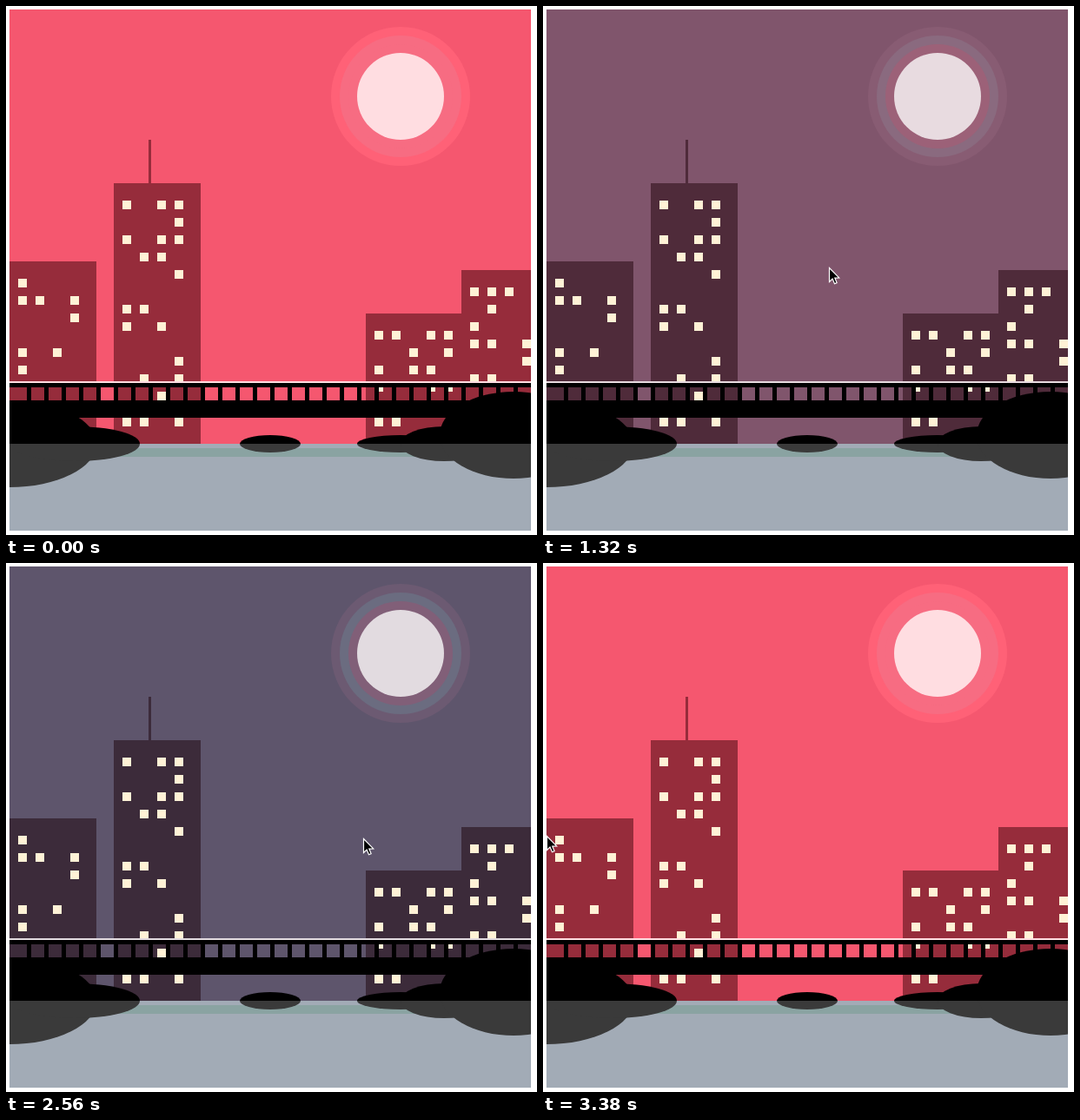
Recreate the animation shown at these times as an HTML page with a canvas. Size 611 px wide and 609 px high, loop 3.42 s.

```html
<!DOCTYPE html>
<html lang="en">
<head>
<meta charset="utf-8">
<title>City dusk</title>
<style>
html, body { margin: 0; width: 100%; height: 100%; overflow: hidden; background: #fff; }
canvas { display: block; }
</style>
</head>
<body>
<canvas id="stage" width="611" height="609"></canvas>
<script>
const ctx = document.getElementById("stage").getContext("2d");
const LOOP = 3420, SHOW = 160, STEP = 20;

// Pointer path: time, x, y
const path = [
  [160, 0, 309], [660, 70, 304], [1120, 234, 301], [1620, 481, 303],
  [1780, 549, 304], [1960, 606, 305], [2120, 606, 306], [2260, 574, 307],
  [2560, 411, 317], [2920, 128, 318], [3180, 38, 316], [3380, 4, 314]
];

// Pointer x, then sky, walls, moon and the glow rings from outside in
const tones = [
  [4, "f5576f", "962c3b", "ffdde1", "ff6177", "f76c82", "f76c82"],
  [128, "cd536b", "7e2b3a", "f2dbe0", "cf6076", "d1677d", "d1677d"],
  [234, "a8556b", "642b3a", "f0dbe0", "a85e74", "ae677e", "bb6378"],
  [411, "5e556c", "3c2b3a", "e2dbe0", "6c5a72", "6b6c80", "815f78"],
  [481, "46546c", "252b3a", "e2dbe0", "4a6178", "656680", "6f6780"],
  [574, "1c556c", "0e2b3a", "d5dbe2", "295f75", "35667b", "496b80"]
];

// Each building: x, y, width, then lit rows as y followed by x positions
const buildings = [
  { box: [4, 294, 100], lit: [[314, 14], [334, 14, 34, 74], [354, 74], [394, 14, 54], [414, 14]] },
  { box: [124, 204, 100], lit: [
    [224, 134, 174, 194], [244, 194], [264, 134, 174, 194], [284, 154, 174],
    [304, 194], [344, 134, 154], [364, 134, 174], [404, 194], [424, 154, 194],
    [444, 174], [474, 134, 154, 194]] },
  { box: [414, 354, 110], lit: [
    [374, 424, 444, 484, 504], [394, 464, 504], [414, 424, 464, 484],
    [434, 424, 484, 504], [474, 424, 444]] },
  { box: [524, 304, 80], lit: [
    [324, 534, 554, 574], [344, 554], [364, 534], [384, 534, 554, 594],
    [404, 594], [424, 534, 554]] }
];

// Rocks: centre x, centre y, radii
const rocks = [
  [4, 504, 100, 50], [79, 504, 75, 20], [304, 504, 35, 10],
  [454, 504, 50, 10], [504, 504, 50, 20], [584, 494, 85, 50]
];

const arrow = [[0, 0], [0, 16], [3.6, 12.6], [6, 18.2], [8.6, 17.1], [6.3, 11.6], [11.2, 11.4]];

function rect(color, x, y, w, h) {
  ctx.fillStyle = color;
  ctx.fillRect(x, y, w, h);
}

function ellipse(color, x, y, rx, ry) {
  ctx.fillStyle = color;
  ctx.beginPath();
  ctx.ellipse(x, y, rx, ry, 0, 0, Math.PI * 2);
  ctx.fill();
}

function slope(i, k) {
  return (path[i + 1][k] - path[i][k]) / (path[i + 1][0] - path[i][0]);
}

function tangent(i, k) {
  if (i === 0) return slope(0, k) * 0.6;
  if (i === path.length - 1) return slope(i - 1, k) * 0.6;
  const a = slope(i - 1, k), b = slope(i, k);
  return a * b > 0 ? 2 * a * b / (a + b) : 0;
}

// Monotone cubic through the path points
function along(t, k) {
  let i = 0;
  while (i < path.length - 2 && t > path[i + 1][0]) i++;
  const p = path[i], q = path[i + 1], d = q[0] - p[0];
  const u = Math.min(1, Math.max(0, (t - p[0]) / d)), v = 1 - u;
  return v * v * ((1 + 2 * u) * p[k] + u * d * tangent(i, k)) +
         u * u * ((1 + 2 * v) * q[k] - v * d * tangent(i + 1, k));
}

function mix(a, b, u) {
  const part = (s, i) => parseInt(s.substr(i, 2), 16);
  return "rgb(" + [0, 2, 4].map(i => Math.round(part(a, i) * (1 - u) + part(b, i) * u)) + ")";
}

function palette(x) {
  let i = 0;
  while (i < tones.length - 2 && x > tones[i + 1][0]) i++;
  const a = tones[i], b = tones[i + 1];
  const u = Math.min(1, Math.max(0, (x - a[0]) / (b[0] - a[0])));
  return a.slice(1).map((c, j) => mix(c, b[j + 1], u));
}

function drawCity(walls) {
  rect(walls, 164, 154, 3, 50);
  for (const { box: [x, y, w], lit } of buildings) {
    rect(walls, x, y, w, 504 - y);
    for (const [row, ...cols] of lit)
      for (const col of cols) rect("#fff2d6", col, row, 10, 10);
  }
}

function drawBridge(rail) {
  rect(rail, 4, 432, 600, 2);
  rect("#000", 4, 434, 600, 5);
  rect("#000", 4, 454, 600, 20);
  for (let x = 24; x < 604; x += 20) rect("#000", x, 439, 5, 15);
}

function drawRocks(color, top, height) {
  ctx.save();
  ctx.beginPath();
  ctx.rect(4, top, 600, height);
  ctx.clip();
  for (const r of rocks) ellipse(color, ...r);
  ctx.restore();
}

function drawPointer(x, y) {
  ctx.save();
  ctx.translate(Math.round(x) + 0.5, Math.round(y) + 0.5);
  ctx.beginPath();
  for (const p of arrow) ctx.lineTo(...p);
  ctx.closePath();
  ctx.fillStyle = "#000";
  ctx.strokeStyle = "#fff";
  ctx.lineWidth = 1.2;
  ctx.fill();
  ctx.stroke();
  ctx.restore();
}

function draw(t) {
  const x = along(t, 1), y = along(t, 2);
  const [sky, walls, moon, ...rings] = palette(t < SHOW ? 0 : x);
  rect("#fff", 0, 0, 611, 609);
  rect(sky, 4, 4, 600, 500);
  rings.forEach((c, i) => ellipse(c, 454, 104, 80 - i * 10, 80 - i * 10));
  ellipse(moon, 454, 104, 50, 50);
  drawCity(walls);
  drawBridge(moon);
  rect("#a2abb6", 4, 504, 600, 100);
  rect("#8aa3a2", 4, 509, 600, 10);
  drawRocks("#000", 4, 500);
  drawRocks("#3a3a3a", 504, 100);
  if (t >= SHOW) drawPointer(x, y);
}

const start = performance.now();
function tick() {
  const t = (performance.now() - start) % LOOP;
  draw(Math.floor(t / STEP) * STEP);
  requestAnimationFrame(tick);
}
tick();
</script>
</body>
</html>
```
